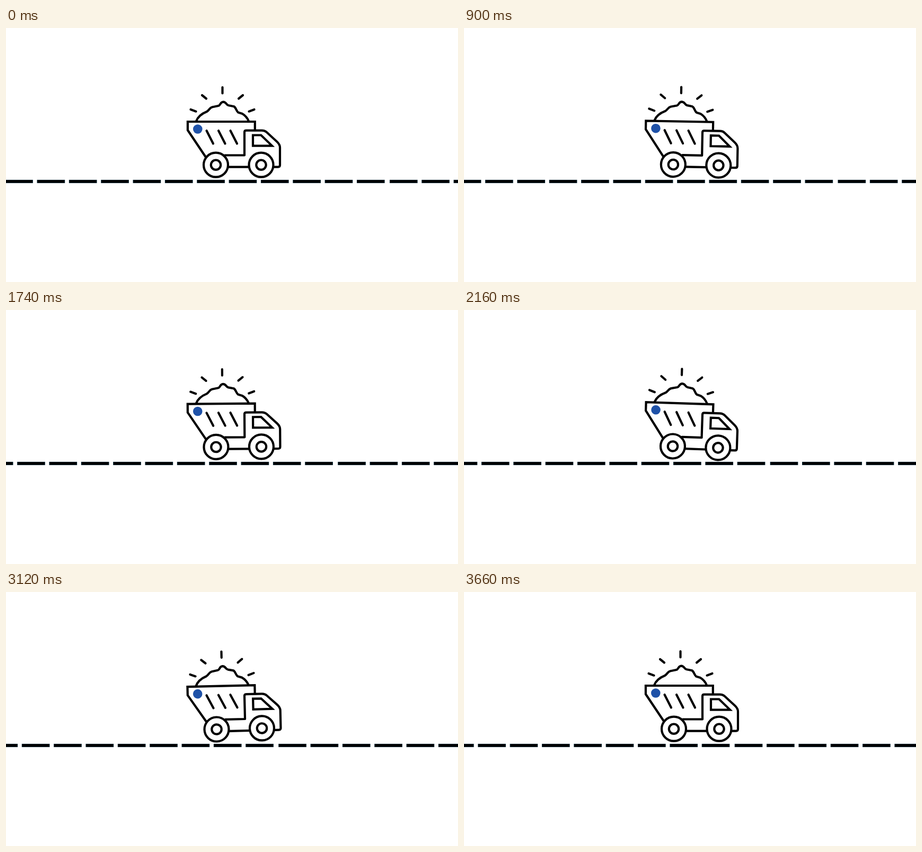
An HTML page with a canvas for the animation above (3.72 s loop, 853 by 480 pixels).

```html
<!DOCTYPE html>
<html lang="en">
<head>
<meta charset="utf-8">
<title>Dump truck</title>
<style>
  html, body { margin: 0; width: 100%; height: 100%; overflow: hidden; background: #fff; }
  canvas { display: block; }
</style>
</head>
<body>
<canvas id="stage" width="853" height="480"></canvas>
<script>
const ctx = document.getElementById('stage').getContext('2d');
const WIDTH = 853, HEIGHT = 480;
const LOOP = 3720, STEP = 60, DELAY = 15, DURATION = 3600;
const PIVOT = { x: 430.5, y: 197 };
const DASH = { width: 52.7, pitch: 60.35, top: 286.9, height: 6.2 };
const SEAM = { start: 724, pitch: 62, travel: 213.3 };

const rays = new Path2D(
  'M408.5 112V123.5 M370 127L378 133.5 M447 127L439 133.5 ' +
  'M348.5 154L358.5 157.7 M468.5 154L458.5 157.7');
const mound = new Path2D(
  'M359 176C362 168 369 162 379 158C383 156 384 151 389 149.5L401 147' +
  'C405 146 404 140 410 139.7C416 140 415 145 420 146.3L430 148.3' +
  'C434 150 434 156 438 159.5L446 162C451 165 455 169 458 176');
const bed = new Path2D('M377 244L342.9 193V177H469.8V193');
const hatches = new Path2D(
  'M378.5 194L391 218.5 M401 194L413.5 218.5 M423.5 194L436 218.5');
const cab = new Path2D(
  'M413 240.5H450V197Q450 193.7 453.3 193.7H483C487 193.7 489.5 194.7 492 197' +
  'L511.5 215C515 218.3 517 221.5 517 226V259Q517 262.6 513.4 262.6H505 M420 262.6H458');
const cabWindow = new Path2D('M466 202.5H481.3L502 222.6H466Z');

function disc(x, y, radius) {
  const path = new Path2D();
  path.arc(x, y, radius, 0, Math.PI * 2);
  return path;
}

function wheel(x, y) {
  const tyre = disc(x, y, 23);
  ctx.fillStyle = '#fff';
  ctx.fill(tyre);
  ctx.stroke(tyre);
  ctx.stroke(disc(x, y, 9.2));
}

// Five equal linear swings: 0, 2, -2, 2, -2, 0 degrees.
function tilt(progress) {
  const stops = [0, 2, -2, 2, -2, 0];
  const i = Math.min(4, Math.floor(progress * 5));
  const degrees = stops[i] + (stops[i + 1] - stops[i]) * (progress * 5 - i);
  return degrees * Math.PI / 180;
}

function drawRoad(progress) {
  const eased = progress - Math.sin(2 * Math.PI * progress) / (2 * Math.PI);
  const seam = SEAM.start - SEAM.travel * eased;
  const { width, pitch, top, height } = DASH;
  const dash = x => {
    ctx.fillStyle = '#042433';
    ctx.fillRect(x, top, width, height);
    ctx.fillStyle = '#000';
    ctx.fillRect(x + 0.9, top + 0.7, width - 1.8, height - 1.4);
  };
  for (let x = seam; x < WIDTH; x += pitch) dash(x);
  for (let x = seam - SEAM.pitch; x > -width; x -= pitch) dash(x);
}

function drawTruck(progress) {
  ctx.save();
  ctx.translate(PIVOT.x, PIVOT.y);
  ctx.rotate(tilt(progress));
  ctx.translate(-PIVOT.x, -PIVOT.y);

  ctx.strokeStyle = '#000';
  ctx.lineWidth = 4.2;
  ctx.lineCap = 'round';
  ctx.lineJoin = 'round';
  [rays, mound, hatches, cab].forEach(path => ctx.stroke(path));
  ctx.lineCap = 'butt';
  ctx.lineJoin = 'miter';
  ctx.stroke(bed);
  ctx.stroke(cabWindow);
  wheel(396, 258.7);
  wheel(481.5, 258.7);

  ctx.fillStyle = '#1f52a8';
  ctx.fill(disc(361.8, 191, 8.8));
  ctx.restore();
}

function render(now) {
  const time = Math.floor((now % LOOP) / STEP) * STEP;
  const progress = Math.min(1, Math.max(0, (time - DELAY) / DURATION));
  ctx.fillStyle = '#fff';
  ctx.fillRect(0, 0, WIDTH, HEIGHT);
  drawRoad(progress);
  drawTruck(progress);
}

const begin = performance.now();
function tick() {
  render(performance.now() - begin);
  requestAnimationFrame(tick);
}
tick();
</script>
</body>
</html>
```
